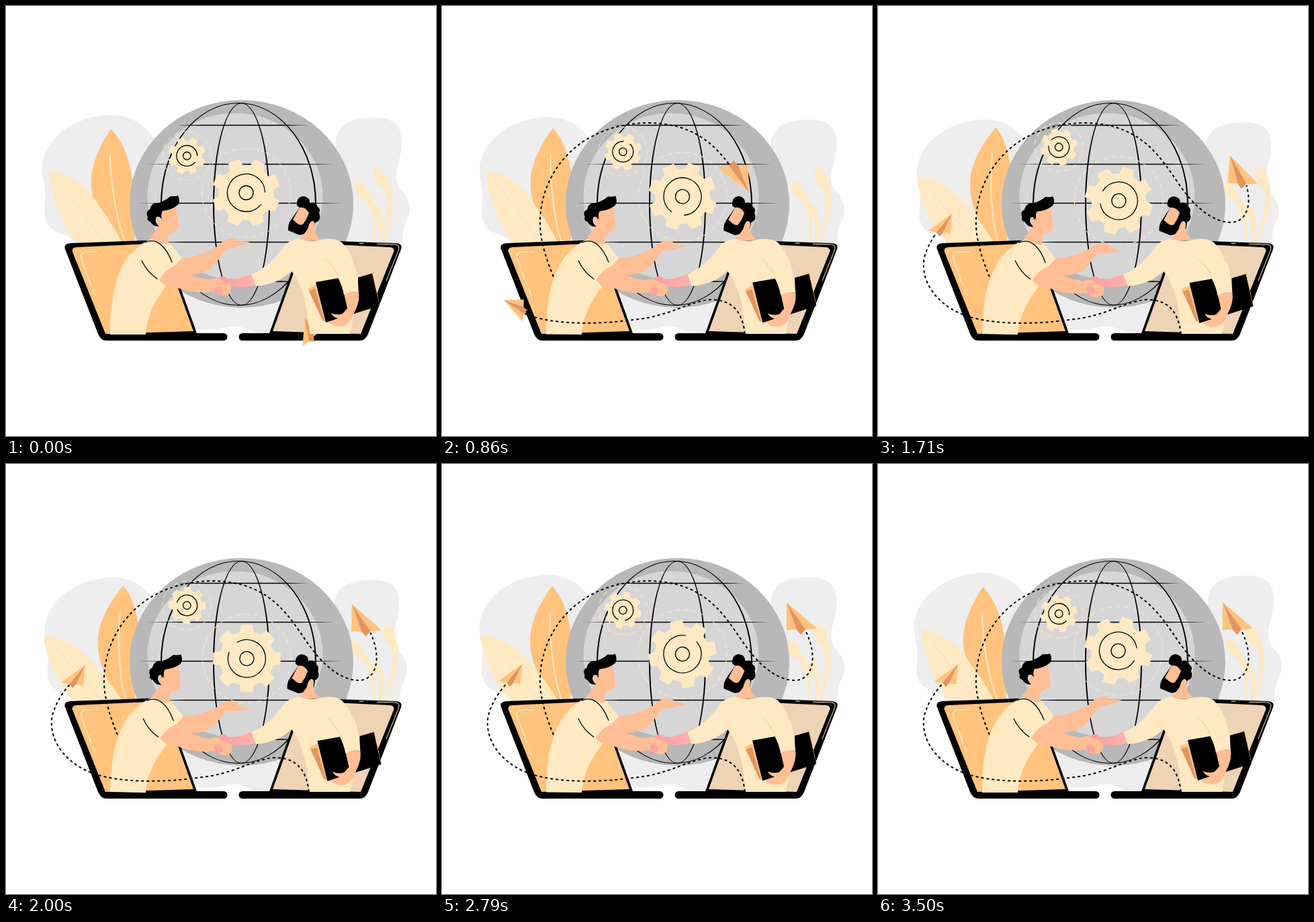
Animation, 640 px wide and 640 px high, one loop 3.57 s. Source, as an HTML page:

```html
<!DOCTYPE html>
<html lang="en">
<head>
<meta charset="utf-8">
<title>Handshake</title>
<style>
html, body { margin: 0; width: 100%; height: 100%; overflow: hidden; background: #fff; }
svg { display: block; width: 100%; height: 100%; }
.k { fill: #000; } .o { fill: #ffc37d; } .c { fill: #fee9c3; } .s { fill: #ffbe94; } .b { fill: #e2955f; }
.line { fill: none; stroke: #000; stroke-width: 1.3; stroke-linecap: round; vector-effect: non-scaling-stroke; }
.cl { fill: none; stroke: #fee9c3; stroke-linecap: round; }
.route { fill: none; stroke: #000; stroke-width: 2; }
</style>
</head>
<body>
<svg viewBox="0 0 640 640">
  <defs>
    <linearGradient id="pink"><stop offset="0" stop-color="#ff9ca3"/><stop offset="1" stop-color="#ffb3ad"/></linearGradient>
    <path id="frame" d="M88 362Q85 354 96 353L234 348L284 487H324a5.5 5.5 0 0 1 0 11H150Q141 498 137 488Z"/>
    <path id="screen" d="M99 366Q97 360 105 359L232 353L279 484L148 488Z"/>
    <g id="plane">
      <path class="o" d="M51 0L17-23L9-10ZM51 0L2 0L-6 16Z"/>
      <path class="b" d="M51 0L9-10L-1-9L2 1Z"/>
    </g>
    <g id="gear">
      <circle class="cl" r="66" stroke-width="1" stroke-dasharray="7 5.6" style="vector-effect:non-scaling-stroke"/>
      <path id="cog" class="c"/>
      <path id="ring" class="line"/>
      <circle class="line" r="10.5"/>
    </g>
  </defs>

  <path id="blob" fill="#eee" d="M54 240C56 200 98 164 155 162C190 162 210 180 225 205L300 330L491 240V205C490 180 510 166 545 166C580 165 590 180 589 205C588 235 574 248 585 270C600 284 604 300 598 315C590 330 590 340 590 356L520 480L400 488C375 489 362 483 350 478Q335 474 322 480Q300 484 270 480L150 475C118 440 95 415 102 360Q101 345 88 341C62 332 55 322 58 295C61 270 53 260 54 240Z"/>

  <g id="leaf">
    <path class="o" d="M156 183C182 208 198 265 190 356H172C140 320 125 290 127 255C130 225 145 200 156 183Z"/>
    <path class="cl" stroke-width="2" d="M155 223C156 270 165 320 178 352"/>
  </g>
  <g id="pale">
    <path class="c" d="M65 246C85 247 118 262 140 300Q162 328 175 358H112C80 325 68 285 65 246Z"/>
    <path fill="none" stroke="#e8e1d4" d="M82 266Q112 305 147 354"/>
  </g>
  <path id="stemL" class="c" d="M521 262C530 260 537 266 540 280C552 290 553 320 549 356H546C548 325 545 300 533 288C522 284 514 268 521 262Z"/>
  <path id="stemR" class="c" d="M549 240C560 238 566 250 568 260C580 280 573 320 563 358H560C566 325 572 295 563 272C550 266 544 250 549 240Z"/>
  <path class="c" d="M546 297C554 294 559 302 560 310C564 325 561 340 557 356H554C557 335 557 322 553 314C545 308 543 300 546 297Z"/>

  <ellipse cx="350.5" cy="294.5" rx="166.5" ry="154.5" fill="#b8b8b8"/>
  <ellipse cx="341" cy="283" rx="130.5" ry="123.5" fill="#d6d6d6"/>
  <g id="grid" class="k" fill-rule="evenodd"></g>

  <use id="gearS" href="#gear"/>
  <use id="gearB" href="#gear"/>

  <use href="#frame"/>
  <use href="#screen" class="o"/>
  <path class="cl" stroke-width="1.6" d="M136 366H119Q109 367 112 376L126 414M129 421L133 431"/>
  <g transform="matrix(-1 0 0 1 676 0)">
    <use href="#frame"/>
    <use href="#screen" fill="#eed3b5"/>
  </g>
  <path class="cl" stroke-width="1" d="M526 353L532 353.300M552 354L580 355Q587 356 584 364L566 409"/>

  <path id="routeA" class="route" d="M188 450C170 415 144 360 146 318C148 250 200 174 310 174C400 176 425 235 455 275C480 308 505 323 528 322C552 319 560 287 541 248L513 206"/>
  <use id="planeA" href="#plane"/>

  <g id="palm">
    <path class="s" d="M240 372L262 375C280 375 300 366 316 357L328 361L312 384C296 403 262 404 248 390Z"/>
    <path id="hand" class="s" d="M314 360C321 348 330 346 338 346L344 348L338 350.500L356 350.500L363 351.500Q357 354 351 355.500Q342 360 327 362Z"/>
  </g>

  <path fill="url(#pink)" d="M368 397C352 405 340 408 330 406Q326 401 319 403Q314 407 316 412L318 420L335 417C350 419 362 418 373 415Z"/>
  <g id="left">
    <path class="s" d="M248 382C265 398 285 406 304 407Q312 402 320 408L335 415Q337 430 325 431Q314 430 308 425C280 430 248 420 222 404Z"/>
    <path class="c" d="M155 489C155 430 165 385 195 360C203 353 214 346 222 345L243 352L262 375Q256 382 252 386Q236 393 228 408L238 417C220 440 210 462 208 489Z"/>
    <path class="s" d="M224 312L230 318L232 304Q245 304 252 296L257 325Q257 336 245 337L240 344L242 354Q228 356 214 345Q223 336 226 326Z"/>
    <path class="k" d="M211 314Q207 306 214 303Q216 292 227 293Q237 290 245 283Q252 284 256 282Q260 290 256 296Q246 304 233 305Q230 309 232 318Q229 312 224 314Q220 321 228 328Q219 329 215 321Q209 320 211 314Z"/>
    <path class="line" d="M207 352C224 344 238 358 247 381M202 379Q210 396 225 406"/>
  </g>
  <ellipse cx="316" cy="424" rx="6" ry="7" fill="#ffa3a3" transform="rotate(-35 316 424)"/>

  <path id="routeB" class="route" d="M452 500C450 465 440 438 402 437C370 438 340 462 285 467C235 474 160 476 119 456C70 432 62 390 71 368C76 352 86 338 96 327L119 298"/>
  <use id="planeB" href="#plane"/>

  <path class="c" d="M426 349Q436 345 440 347Q452 352 467 348Q490 344 500 352C515 368 522 390 525 424L512 488H452C449 450 442 415 425 395C410 408 395 415 372 417L365 399C385 393 405 370 412 360Q418 351 426 349Z"/>
  <g id="head">
    <path class="k" d="M433 297Q432 284 443 283Q453 285 452 293Q462 291 463 298Q469 302 466 308Q470 319 461 322L446 338Q438 343 432 339L420 334Q419 325 425 317L437 300Z"/>
    <path class="s" d="M437 300Q445 298 451 308Q448 317 442 325Q438 327 434 324L427 318Z"/>
    <path class="s" d="M449 332Q452 319 457 320Q461 322 459 330Q459 340 468 347Q452 353 437 346Q443 341 446 336Z"/>
  </g>
  <g id="book">
    <path class="o" d="M449 421L463 414L479 470L473 469ZM538 399L546 396L556 445L550 446Z"/>
    <path class="b" d="M451 424L460 421L474 469L471 468Z"/>
    <path class="k" d="M461 411L495 405L506 426L524 424V404L545 398L556 446L515 459L476 471Z"/>
    <path class="s" d="M503 428Q514 423 525 427Q527 440 518 457Q513 475 498 477Q486 477 480 470L494 465Q485 462 484 457Q492 461 501 458L508 450Z"/>
    <path class="c" d="M477 380L517 380Q524 403 525 427Q513 423 503 430Q498 403 477 380Z"/>
    <path fill="none" stroke="#ffc37d" d="M475 376Q488 388 495 403"/>
  </g>
</svg>
<script>
const LOOP = 3570, STEP = LOOP / 50, FLIGHT = 2200;
const $ = id => document.getElementById(id);
const place = (id, transform) => $(id).setAttribute('transform', transform);
const polar = (r, deg) => {
  const a = deg * Math.PI / 180;
  return `${(r * Math.cos(a)).toFixed(2)} ${(r * Math.sin(a)).toFixed(2)}`;
};

// Eight-toothed cog with an open ring
const teeth = [];
for (let a = 23.5; a < 383; a += 45)
  teeth.push(polar(41, a - 15), polar(51, a - 10), polar(51, a + 10), polar(41, a + 15));
$('cog').setAttribute('d', `M${teeth.join('L')}Z`);
$('ring').setAttribute('d', `M${polar(28, 39)}A28 28 0 1 1 ${polar(28, -2)}`);

// Globe lines swell towards their middle
const oval = (cx, rx, ry) => `M${cx - rx} 295a${rx} ${ry} 0 1 0 ${2 * rx} 0a${rx} ${ry} 0 1 0 ${-2 * rx} 0Z`;
const meridian = (cx, rx) => oval(cx, rx + 1, 151) + oval(cx, rx - 1, 150);
const parallel = ([y, half]) => {
  const mid = half * .6;
  return `M${350 - half} ${y}L${350 - mid} ${y - .7}H${350 + mid}L${350 + half} ${y}L${350 + mid} ${y + .7}H${350 - mid}Z`;
};
const lines = [meridian(346, 115), meridian(350.5, 41.5),
  ...[[177.5, 100], [235.5, 140], [293.5, 152], [351.5, 140], [410, 100]].map(parallel)];
$('grid').innerHTML = lines.map(d => `<path d="${d}"/>`).join('');

// Cubic Bezier easing (.25, .1, .2, 1)
function ease(x) {
  const curve = (s, a, b) => 3 * s * (1 - s) ** 2 * a + 3 * s * s * (1 - s) * b + s ** 3;
  let lo = 0, hi = 1;
  for (let i = 0; i < 24; i++) {
    const mid = (lo + hi) / 2;
    if (curve(mid, .25, .2) < x) lo = mid; else hi = mid;
  }
  return curve(lo, .1, 1);
}

// The nose runs ahead on the route, the dashes end at the tail
function fly(name, nose, scale, flip, p) {
  const route = $('route' + name);
  const len = (route.getTotalLength() - nose) * p;
  const tail = route.getPointAtLength(len), tip = route.getPointAtLength(len + nose);
  const angle = Math.atan2(tip.y - tail.y, tip.x - tail.x) * 180 / Math.PI;
  const run = Math.max(len - 4, 0);
  const dashes = '0 4 ' + '4 4 '.repeat(Math.floor(run / 8)) + Math.min(run % 8, 4) + ' 2000';
  route.setAttribute('stroke-dasharray', dashes);
  place('plane' + name, `translate(${tail.x} ${tail.y}) rotate(${angle}) scale(${scale} ${scale * flip})`);
}

function draw(now) {
  const t = Math.floor(now % LOOP / STEP + .1) * STEP % LOOP;
  const turn = t / LOOP * 360;
  const wave = ms => Math.cos(ms / LOOP * 2 * Math.PI);
  const k = (1 - wave(t)) / 2;
  const sway = 3.5 * (wave(t - 500) - wave(500));

  place('blob', `translate(328 480) scale(${1 - .015 * k} ${1 - .022 * k}) translate(-328 -480)`);
  place('leaf', `rotate(${6.4 * k} 185 355)`);
  place('pale', `rotate(${sway} 175 350)`);
  place('stemL', `rotate(${sway} 553 352)`);
  place('stemR', `rotate(${8 * k} 562 355)`);
  place('gearS', `translate(269.300 ${223 - 13 * k}) rotate(${-turn}) scale(.55)`);
  place('gearB', `translate(${357.5 + .9 * k} ${278 + 12 * k}) rotate(${turn})`);
  place('left', `rotate(${1.2 * k} 200 488)`);
  place('palm', `rotate(${3 * k} 255 385)`);
  place('hand', `rotate(${10 * k} 318 358)`);
  place('head', `rotate(${-1.2 * k} 455 400)`);
  place('book', `translate(${2.5 * k} ${k})`);

  const p = ease(Math.min(t / FLIGHT, 1));
  fly('A', 51, 1, 1, p);
  fly('B', 37, .73, -1, p);
  requestAnimationFrame(() => draw(performance.now() - start));
}
const start = performance.now();
draw(0);
</script>
</body>
</html>
```
